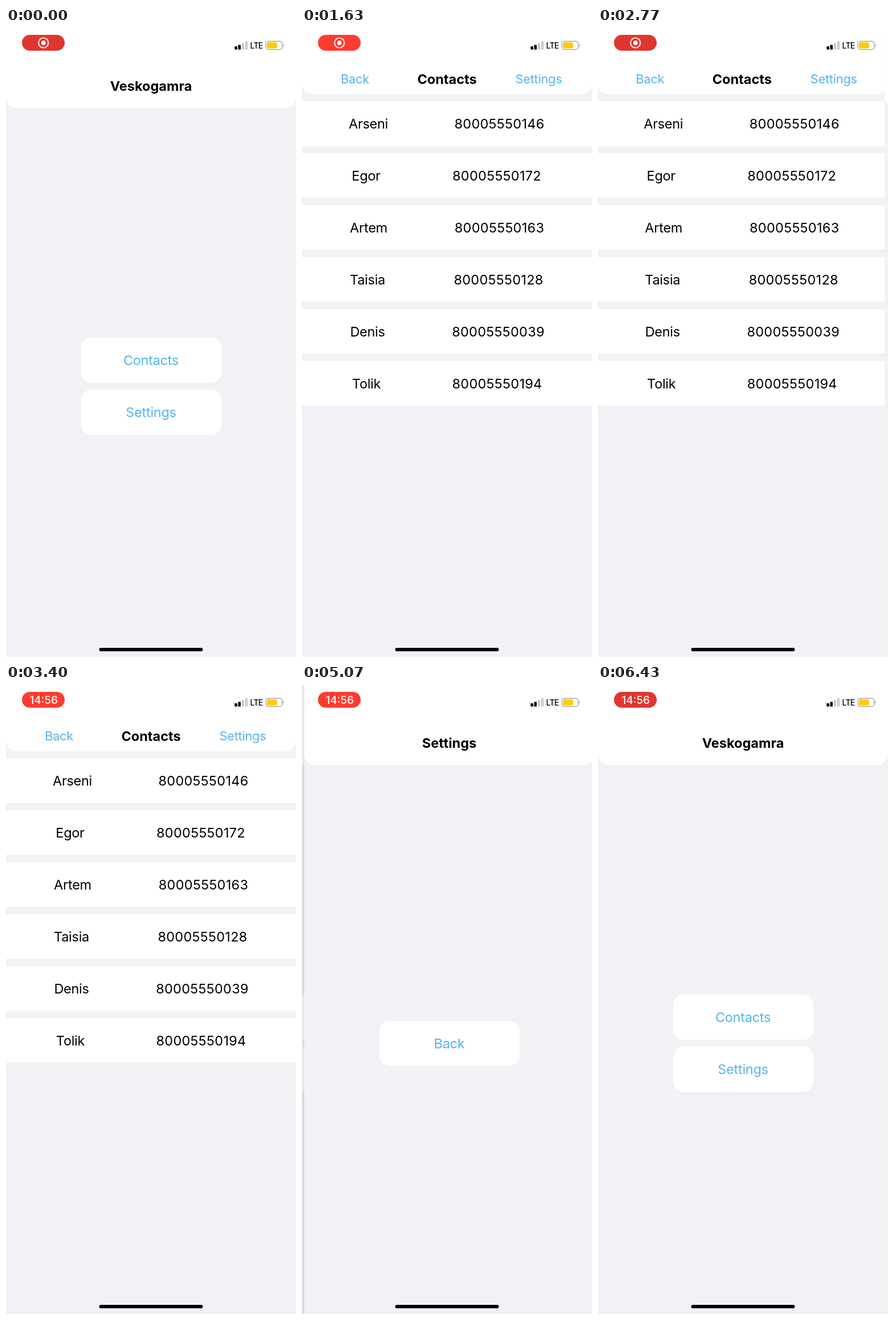
Write an HTML page that moves like this. It is 509x1101 px and loops after 6570 ms.

```html
<!DOCTYPE html>
<html lang="en">
<head>
<meta charset="utf-8">
<title>Messenger navigation</title>
<style>
  html, body { margin: 0; width: 100%; height: 100%; overflow: hidden; background: #f3f1f5; }
  body {
    position: relative;
    font: 400 23.5px/1 Inter, "Liberation Sans", sans-serif;
    font-optical-sizing: none;
    color: #000;
  }
  .page { position: absolute; left: 0; top: 0; width: 509px; height: 1101px; background: #f3f1f5; overflow: hidden; }
  .dim { position: absolute; inset: 0; background: #000; opacity: 0; }
  .head { position: absolute; left: 0; top: 0; width: 100%; height: 140px; background: #fff; border-radius: 0 0 19px 19px; }
  .head.low { height: 115.5px; }
  .card { position: absolute; left: 131.5px; width: 246px; height: 78.5px; background: #fff; border-radius: 18px; }
  .row { position: absolute; left: 0; width: 100%; height: 78.5px; background: #fff; }
  .txt {
    position: absolute; left: var(--x, 254.5px); top: var(--y);
    transform: translate(-50%, -50%);
    white-space: nowrap; letter-spacing: -.012em;
  }
  .title { font-weight: 700; letter-spacing: 0; }
  .link { color: #55b4ef; }
  .small { font-size: 21.8px; }
  .num { letter-spacing: .012em; }
  .over { position: absolute; left: 0; top: 0; }
  .over text { font-family: Inter, "Liberation Sans", sans-serif; }
</style>
</head>
<body>
<div class="page" id="home">
  <div class="head"></div>
  <span class="txt title" style="--y:101.5px">Veskogamra</span>
  <div class="card" style="top:542px"></div>
  <span class="txt link" id="homeContacts" style="--y:582px">Contacts</span>
  <div class="card" style="top:633px"></div>
  <span class="txt link" id="homeSettings" style="--y:673px">Settings</span>
  <div class="dim"></div>
</div>

<div class="page" id="contacts">
  <div class="head low"></div>
  <span class="txt link small" id="contactsBack" style="--x:93px;--y:90px">Back</span>
  <span class="txt title" style="--y:89.5px">Contacts</span>
  <span class="txt link small" id="contactsSettings" style="--x:415.5px;--y:90px">Settings</span>
  <div id="list"></div>
  <div class="dim"></div>
</div>

<div class="page" id="settings">
  <div class="head"></div>
  <span class="txt title" style="--y:101.5px">Settings</span>
  <div class="card" style="top:587.5px"></div>
  <span class="txt link" id="settingsBack" style="--y:627.5px">Back</span>
  <div class="dim"></div>
</div>

<svg class="over" width="509" height="1101" viewBox="0 0 509 1101">
  <rect id="pill" x="28" y="12" width="75" height="27.7" rx="13.85"/>
  <g id="rec" fill="#fff">
    <circle cx="65.7" cy="26" r="8.6" fill="none" stroke="#fff" stroke-width="1.9"/>
    <circle cx="65.7" cy="26" r="3.9"/>
  </g>
  <text id="clock" x="66.2" y="32.8" font-size="19" font-weight="500" text-anchor="middle" fill="#fff">14:56</text>

  <rect x="401.3" y="32" width="4.6" height="5.8" rx="1.2"/>
  <rect x="407.4" y="29.5" width="4.6" height="8.3" rx="1.2"/>
  <g fill="#ccc">
    <rect x="413.5" y="26.5" width="4.6" height="11.3" rx="1.2"/>
    <rect x="419.6" y="23.3" width="4.6" height="14.5" rx="1.2"/>
  </g>
  <text x="428.6" y="36" font-size="14" font-weight="500" letter-spacing="-.8">LTE</text>
  <rect x="456" y="23.3" width="28.8" height="14.4" rx="4.4" fill="none" stroke="#999" stroke-width="1.2"/>
  <rect x="458" y="25.3" width="18" height="10.4" rx="2.5" fill="#fecc05"/>
  <path d="M486.3 28 q3.2 2.5 0 5z" fill="#999"/>
  <rect x="163.5" y="1085" width="182" height="6" rx="3"/>
</svg>

<script>
const LOOP = 6570, W = 509, RATE = 0.019;
const $ = id => document.getElementById(id);
const pages = ["home", "contacts", "settings"];

// name, number, centre of name, centre of number
const people = [
  ["Arseni", "80005550146", 116.5, 346.5],
  ["Egor", "80005550172", 112.5, 342],
  ["Artem", "80005550163", 117, 346.5],
  ["Taisia", "80005550128", 115, 345],
  ["Denis", "80005550039", 115, 344.5],
  ["Tolik", "80005550194", 113, 342.5]
];
$("list").innerHTML = people.map(([name, num, nx, px], i) => {
  const top = 128 + i * 90.9, y = top + 40;
  return `<div class="row" style="top:${top}px"></div>
    <span class="txt" style="--x:${nx}px;--y:${y}px">${name}</span>
    <span class="txt num" style="--x:${px}px;--y:${y}px">${num}</span>`;
}).join("");

const moves = [
  { at: 345, under: "home", over: "contacts", push: true },
  { at: 1706, under: "contacts", over: "settings", push: true },
  { at: 2430, under: "contacts", over: "settings" },
  { at: 3791, under: "home", over: "contacts" },
  { at: 4707, under: "home", over: "settings", push: true },
  { at: 5760, under: "home", over: "settings" }
];

const presses = [
  ["homeContacts", 130, 370],
  ["contactsSettings", 1630, 1710],
  ["settingsBack", 2370, 2440],
  ["contactsBack", 3730, 3795],
  ["homeSettings", 4600, 4710],
  ["settingsBack", 5700, 5765]
];

// spans in which the recording pill is bright
const glows = [[1330, 1750], [3300, 3830], [4830, 5300]];

const ramp = (t, from, len) => Math.min(1, Math.max(0, (t - from) / len));

// remaining distance of a critically damped spring
function rest(ms) {
  const k = ms * RATE;
  return ms > 600 ? 0 : (1 + k) * Math.exp(-k);
}

function place(id, x, dim) {
  const page = $(id);
  page.style.visibility = "visible";
  page.style.transform = `translateX(${x}px)`;
  page.querySelector(".dim").style.opacity = dim;
}

function drawPages(t) {
  const move = moves.filter(m => m.at <= t).pop();
  for (const id of pages) $(id).style.visibility = "hidden";
  if (!move) return place("home", 0, 0);
  const left = rest(t - move.at);
  const cover = move.push ? 1 - left : left;
  if (cover < 1) place(move.under, -0.3 * W * cover, 0.095 * cover);
  if (cover > 0) place(move.over, W * (1 - cover), 0);
}

function drawPresses(t) {
  const alpha = {};
  for (const [id, down, up] of presses) {
    const held = ramp(t, down, 80) * (1 - ramp(t, up, 220));
    alpha[id] = Math.min(alpha[id] ?? 1, 1 - 0.75 * held);
  }
  for (const id in alpha) $(id).style.opacity = alpha[id];
}

function drawPill(t) {
  const glow = Math.max(...glows.map(([on, off]) => ramp(t, on, 90) * (1 - ramp(t, off, 100))));
  const mix = (a, b) => Math.round(a + (b - a) * glow);
  $("pill").setAttribute("fill", `rgb(${mix(224, 255)},${mix(54, 59)},${mix(47, 48)})`);
  const swap = ramp(t, 3040, 320);
  $("rec").setAttribute("opacity", 1 - swap);
  $("clock").setAttribute("opacity", swap);
}

const start = performance.now();
function frame() {
  const t = (performance.now() - start) % LOOP;
  drawPages(t);
  drawPresses(t);
  drawPill(t);
  requestAnimationFrame(frame);
}
frame();
</script>
</body>
</html>
```
